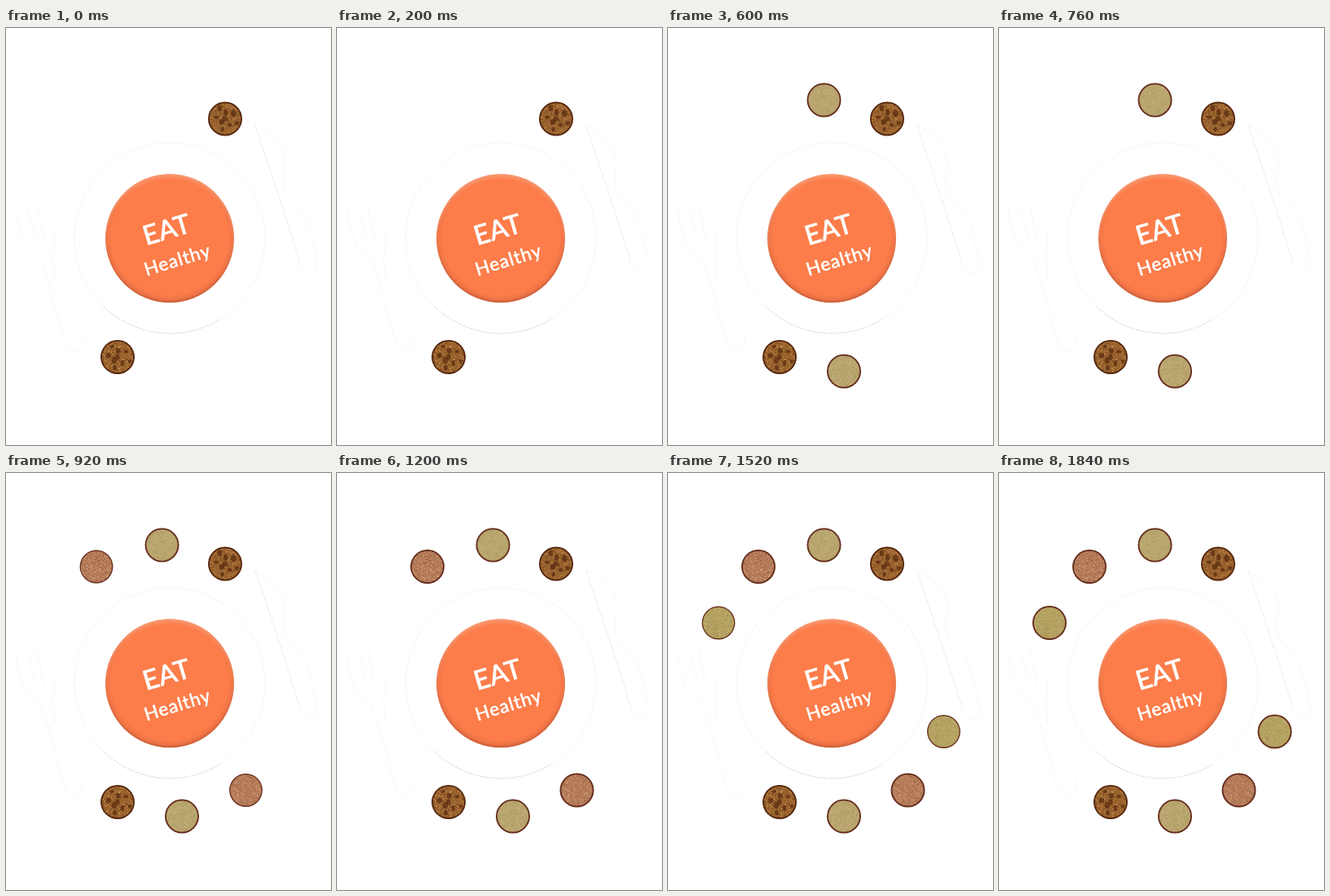
Recreate the animation shown at these times as an HTML page. Size 399x512 px, loop 2700 ms.

```html
<!DOCTYPE html>
<html lang="en">
<head>
<meta charset="utf-8">
<title>Eat Healthy</title>
<style>
  html, body { margin: 0; width: 100%; height: 100%; overflow: hidden; background: #fff; }
  svg { display: block; width: 399px; height: 512px; }
  .edge { fill: none; stroke-width: .5; stroke-linejoin: round; }
  text { font-family: Lato, "Open Sans", sans-serif; fill: #fff; stroke: #fff; stroke-linejoin: round; }
</style>
</head>
<body>
<svg viewBox="0 0 399 512" xmlns="http://www.w3.org/2000/svg">
  <defs>
    <radialGradient id="disc" cx=".5" cy=".485" r=".515">
      <stop offset=".88" stop-color="#fc7d4a"/>
      <stop offset=".95" stop-color="#ee7446"/>
      <stop offset="1" stop-color="#c75a35"/>
    </radialGradient>
    <radialGradient id="shine" cx=".5" cy=".525" r=".525">
      <stop offset=".92" stop-color="#ffb594" stop-opacity="0"/>
      <stop offset="1" stop-color="#ffb594" stop-opacity=".6"/>
    </radialGradient>
    <clipPath id="bowl"><circle r="19.1"/></clipPath>
  </defs>

  <g class="edge" stroke="#c4c4c4" stroke-dasharray="1 2">
    <circle cx="201" cy="258" r="117"/>
    <path stroke="#aaa" stroke-dasharray="2 2" d="M120 342A117 117 0 0 0 262 358"/>
  </g>

  <g class="edge" stroke="#d2d2d2" stroke-dasharray="1 2">
    <path d="M12 222Q14 246 24 267Q30 278 40 281Q48 294 55 325L70 378Q75 397 86 396Q96 393 94 374"/>
    <path d="M57 282Q60 296 59 308M57 282Q62 262 58 248M27 222L36 257M38 218L47 262"/>
    <path d="M306 120Q337 134 343 161L341 190Q342 204 350 211Q372 224 382 288Q383 302 374 302Q364 300 360 287"/>
    <path stroke="#999" d="M306 120L342 228L361 288"/>
  </g>

  <circle cx="201" cy="258.300" r="79" fill="url(#disc)"/>
  <circle cx="201" cy="258.300" r="79" fill="url(#shine)"/>
  <text transform="translate(172 267) rotate(-16.500)" font-size="33" letter-spacing=".3" stroke-width=".9">EAT</text>
  <text transform="translate(172.500 304.500) rotate(-17)" font-size="22.500" letter-spacing="1" stroke-width=".6">Healthy</text>
  <g id="bowls"></g>
</svg>
<script>
const LOOP = 2700, STEP = 40, LAST = 1840, FADE = 600;
const layer = document.getElementById('bowls');

// Each pair becomes visible halfway through its fade.
const foods = [
  { start: -FADE, at: [[269, 111.5], [137, 404]], base: '#96602c', rim: '#54260f',
    specks: [['#b87c3e', 220], ['#d09a58', 120], ['#6e3f18', 130]], lumps: '#56290f' },
  { start: 0, at: [[191.5, 88.5], [216, 421.5]], base: '#b9a56e', rim: '#652c1c',
    specks: [['#c9b681', 220], ['#a8945e', 200]] },
  { start: FADE, at: [[111, 115], [294.5, 389.5]], base: '#b47b59', rim: '#652c1c',
    specks: [['#cf9b79', 200], ['#945b3c', 180], ['#dfb293', 50]] },
  { start: 2 * FADE, at: [[62, 184], [338.5, 317.5]], base: '#b5a262', rim: '#652c1c',
    specks: [['#c5b376', 220], ['#a18f52', 200]] }
];

function make(tag, attrs, parent) {
  const node = document.createElementNS('http://www.w3.org/2000/svg', tag);
  for (const key in attrs) node.setAttribute(key, attrs[key]);
  return parent.appendChild(node);
}

let seed = 11;
function random() {
  seed = (seed * 16807) % 2147483647;
  return seed / 2147483647;
}

function specks(count) {
  let d = '';
  for (let i = 0; i < count; i++) {
    const x = Math.floor(random() * 40 - 20), y = Math.floor(random() * 40 - 20);
    const w = random() < .3 ? 2 : 1;
    d += `M${x} ${y}h${w}v1h${-w}z`;
  }
  return d;
}

function fillBowl(food, parent) {
  make('circle', { r: 19.1, fill: food.base }, parent);
  const g = make('g', { 'clip-path': 'url(#bowl)' }, parent);
  for (const [fill, count] of food.specks) make('path', { d: specks(count), fill, opacity: .75 }, g);
  if (food.lumps) {
    for (let i = 0; i < 9; i++) {
      const angle = i * 2.4, dist = 5.5 * Math.sqrt(i);
      make('ellipse', { cx: dist * Math.cos(angle), cy: dist * Math.sin(angle),
        rx: 2 + random() * 1.5, ry: 2 + random() * 2.5, fill: food.lumps, opacity: .7 }, g);
    }
  }
}

for (const food of foods) {
  food.group = make('g', {}, layer);
  food.rims = food.at.map(([x, y]) => {
    const g = make('g', { transform: `translate(${x} ${y})` }, food.group);
    const rim = make('circle', { fill: food.rim }, g);
    fillBowl(food, g);
    return rim;
  });
}

function draw(ms) {
  const t = Math.min(Math.floor(ms / STEP) * STEP, LAST);
  for (const food of foods) {
    const alpha = Math.min(1, (t - food.start) / FADE);
    food.group.setAttribute('visibility', alpha > .5 ? 'visible' : 'hidden');
    // The soft rim fills out as the fade completes.
    const r = 20.4 + .6 * Math.max(0, 2 * alpha - 1);
    for (const rim of food.rims) rim.setAttribute('r', r);
  }
}

const begin = performance.now();
function tick() {
  draw((performance.now() - begin) % LOOP);
  requestAnimationFrame(tick);
}
tick();
</script>
</body>
</html>
```
